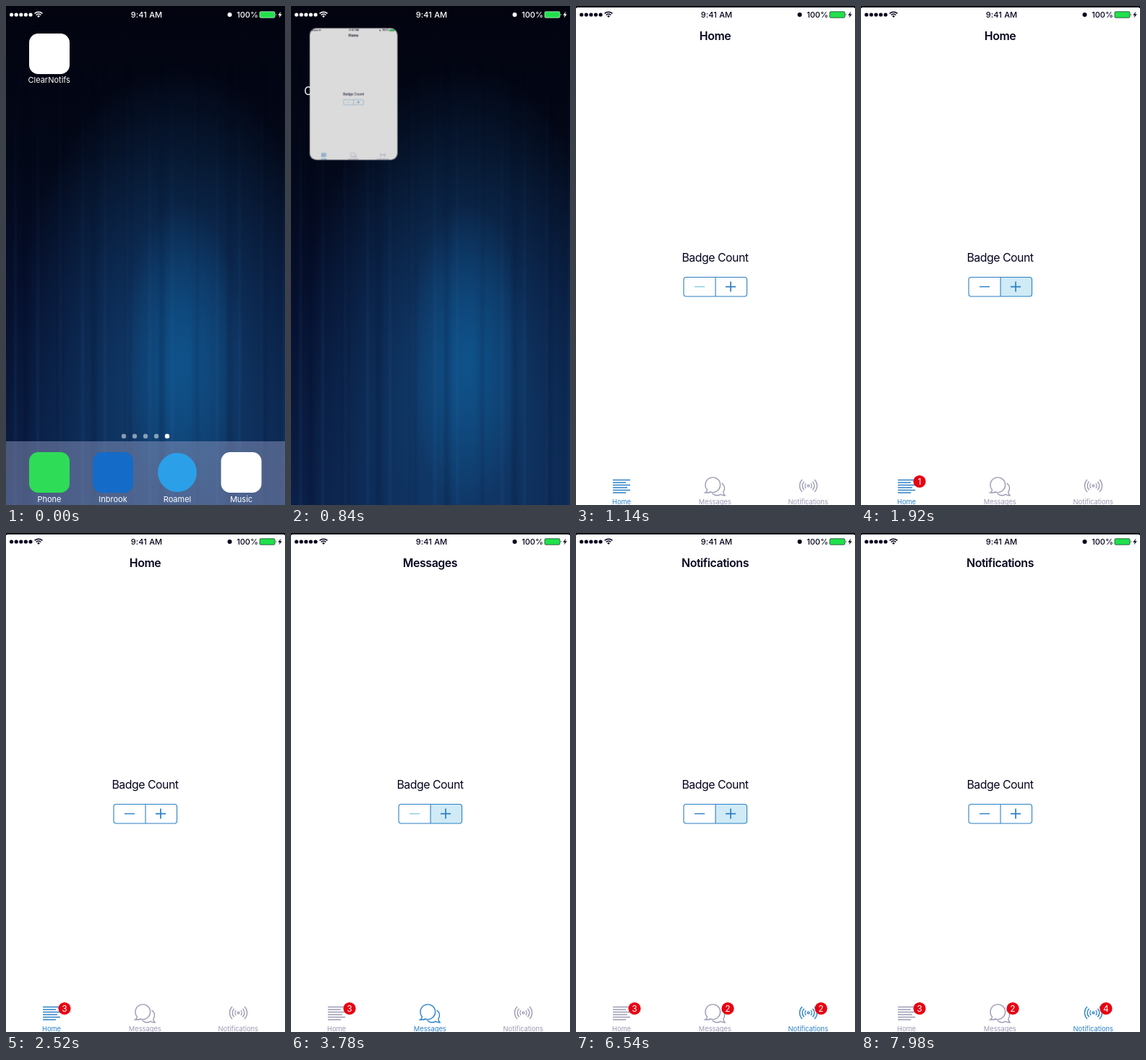
An HTML page that plays this animation: 386x689 px, repeating every 8 s.

```html
<!DOCTYPE html>
<html lang="en">
<head>
<meta charset="utf-8">
<title>Badge count</title>
<style>
html, body { margin: 0; width: 100%; height: 100%; overflow: hidden; background: #02030f; }
#stage { position: relative; width: 386px; height: 689px; overflow: hidden; }
#stage > * { position: absolute; left: 0; top: 0; width: 386px; height: 689px; }
svg { font-family: Inter, Roboto, sans-serif; }
text { text-anchor: middle; fill: currentColor; stroke: none; }

#wall {
  background:
    radial-gradient(ellipse 85px 210px at 245px 485px, rgba(13, 88, 146, .75), transparent),
    radial-gradient(ellipse 230px 440px at 235px 520px, rgba(20, 76, 130, .85), transparent),
    linear-gradient(#02030f, #030818 30%, #06102e 60%, #0b2048);
}
#streaks {
  background:
    repeating-linear-gradient(90deg, transparent 0 9px, rgba(70, 130, 200, .09) 13px, transparent 17px 31px),
    repeating-linear-gradient(90deg, transparent 0 21px, rgba(0, 0, 20, .16) 27px, transparent 35px 47px);
  -webkit-mask-image: linear-gradient(transparent 10%, #000 70%);
  mask-image: linear-gradient(transparent 10%, #000 70%);
}

.status { font-size: 11px; font-weight: 500; }
.label { font-size: 11px; }
#springboard { color: #fff; transform-origin: 60px 65.5px; animation: zoom 8s infinite; }
#icon { animation: press 8s step-end infinite; }
#app {
  color: #05051e; background: #fff; transform-origin: 0 0;
  animation: launch 8s infinite, develop 8s infinite;
}
.title { font-size: 15.85px; font-weight: 600; letter-spacing: -.025em; }
.caption { font-size: 15.85px; letter-spacing: -.03em; }
.tab { color: #9a9ab4; font-size: 9.3px; }
.tab.on, #stepper { color: #2a80c6; }
.line { fill: none; stroke: currentColor; stroke-width: 1.4; }
.badge { color: #fff; font-size: 12px; }

@keyframes zoom {
  0%, 9.125% { transform: none; animation-timing-function: cubic-bezier(.42, 0, .4, 1); }
  14.125%, 100% { transform: scale(3.13); }
}
@keyframes press {
  0% { fill: #fff; opacity: 1; }
  8% { fill: #8a8a90; opacity: 1; }
  9.125%, 100% { fill: #8a8a90; opacity: 0; }
}
@keyframes launch {
  0%, 9.125% {
    transform: translate(32px, 38px) scale(.1451, .0813);
    clip-path: inset(0 0 0 0 round 36px 36px 36px 36px / 46px 46px 46px 46px);
    animation-timing-function: cubic-bezier(.42, 0, .4, 1);
  }
  14.125%, 100% {
    transform: translate(0, 0) scale(1, 1);
    clip-path: inset(2px 0 0 0 round 4px 4px 0 0 / 4px 4px 0 0);
  }
}
@keyframes develop {
  0% { opacity: 0; filter: brightness(.54); animation-timing-function: step-end; }
  9.125% { opacity: 1; filter: brightness(.54); animation-timing-function: linear; }
  10.5% { opacity: 1; filter: brightness(.86); animation-timing-function: linear; }
  13%, 100% { opacity: 1; filter: brightness(1); }
}
</style>
</head>
<body>
<div id="stage">
  <div id="wall"></div>
  <div id="streaks"></div>

  <svg viewBox="0 0 386 689" color="#fff">
    <defs>
      <g id="status" class="status">
        <g id="signal" fill="currentColor"></g>
        <g fill="none" stroke="currentColor" stroke-width="1.5">
          <path d="M39.6 10.4A7.7 7.7 0 0 1 50.4 10.4M41.6 12.5A4.8 4.8 0 0 1 48.4 12.5"/>
        </g>
        <path d="M43.1 13.9A2.7 2.7 0 0 1 46.9 13.9L45 16Z" fill="currentColor"/>
        <text x="194.5" y="16" letter-spacing=".15">9:41 AM</text>
        <circle cx="309.5" cy="12" r="3" fill="currentColor"/>
        <text x="334" y="16">100%</text>
        <rect x="351" y="7.8" width="21" height="8.4" rx="1.4" fill="#22e04c" stroke="currentColor" stroke-width=".6"/>
        <path d="M373 10.4Q374.6 12 373 13.6Z" fill="currentColor"/>
        <path d="M380.3 7.5L376.3 12.7H378.8L377.6 16.5L381.8 11.2H379.2Z" fill="currentColor"/>
      </g>
    </defs>
    <use href="#status"/>
  </svg>

  <svg id="springboard" viewBox="0 0 386 689">
    <rect id="icon" x="32" y="38" width="56" height="56" rx="12.5"/>
    <text class="label" x="59.7" y="106">ClearNotifs</text>
    <g id="pages" fill="#fff"></g>
    <rect y="601" width="386" height="88" fill="rgb(140,150,190)" fill-opacity=".5"/>
    <rect x="32" y="616" width="56" height="56" rx="12.5" fill="#2fdc57"/>
    <rect x="120" y="616" width="56" height="56" rx="12.5" fill="#146bc8"/>
    <circle cx="237" cy="644" r="27" fill="#2b9fe8"/>
    <rect x="297.5" y="616" width="56" height="56" rx="12.5" fill="#fff"/>
    <g class="label">
      <text x="60" y="685">Phone</text>
      <text x="148" y="685">Inbrook</text>
      <text x="237" y="685">Roamel</text>
      <text x="325.5" y="685">Music</text>
    </g>
  </svg>

  <svg id="app" viewBox="0 0 386 689">
    <use href="#status"/>
    <text id="title" class="title" x="192.5" y="47"></text>
    <text class="caption" x="192.5" y="352.7">Badge Count</text>
    <g id="stepper">
      <path id="pressed" d="M193 374.5H233Q236.5 374.5 236.5 378V397.5Q236.5 401 233 401H193Z" fill="#d0eaf6"/>
      <rect class="line" style="stroke-width:1.1" x="149" y="374.5" width="87.5" height="26.5" rx="3.5"/>
      <path class="line" style="stroke-width:1.1" d="M193 374.5V401"/>
      <path id="minus" class="line" d="M164 387.6H178"/>
      <path class="line" style="stroke-width:1.7" d="M207 387.6H221M214 380.6V394.6"/>
    </g>
    <g class="tab">
      <path class="line" d="M51 654.5H75M51 658H69M51 661.5H75M51 665H71M51 668.5H75M51 672H69"/>
      <text x="63" y="688">Home</text>
    </g>
    <g class="tab">
      <path class="line" d="M181.5 668A10.3 10.3 0 1 1 186 671Q183 672.5 178.6 672Q181.4 670.5 181.5 668Z"/>
      <path class="line" d="M201.5 658.8A8.3 8.3 0 0 1 203.8 671Q203.8 674 206 675.7Q202.5 676.2 200 674.3A10 10 0 0 1 188.5 673"/>
      <text x="192.3" y="688">Messages</text>
    </g>
    <g class="tab">
      <g id="waves" class="line"></g>
      <text x="321.3" y="688">Notifications</text>
    </g>
    <g id="badges"></g>
  </svg>
</div>

<script>
const LOOP = 8000;
const PRESS = 200;
const DELAY = 120;
const tabs = [
  { name: 'Home', from: 0, x: 81, taps: [1480, 1840, 2200] },
  { name: 'Messages', from: 3060, x: 210, taps: [3710, 4140] },
  { name: 'Notifications', from: 4860, x: 339, taps: [5700, 6120, 6540, 6960] }
];

const get = id => document.getElementById(id);
const dots = (n, x, step, y, r, fade) => Array.from({ length: n }, (_, i) =>
  `<circle cx="${x + i * step}" cy="${y}" r="${r}" opacity="${i < n - 1 ? fade : 1}"/>`).join('');

get('signal').innerHTML = dots(5, 7.6, 6.6, 12, 2.6, 1);
get('pages').innerHTML = dots(5, 163, 15, 594, 3.2, .5);

// Mirrored arcs around the centre of the broadcast symbol
get('waves').innerHTML = '<circle cx="321.5" cy="662.5" r="1.4"/>' +
  [4.6, 8.3, 12].map(r => {
    const dx = r * Math.cos(.78), dy = r * Math.sin(.78);
    return [-1, 1].map(s => `<path d="M${321.5 + s * dx} ${662.5 - dy}` +
      `A${r} ${r} 0 0 ${s > 0 ? 1 : 0} ${321.5 + s * dx} ${662.5 + dy}"/>`).join('');
  }).join('');

get('badges').innerHTML = tabs.map(({ x }) =>
  `<g class="badge"><circle cx="${x}" cy="656.5" r="8.6" fill="#e60012"/><text x="${x}" y="660.9"></text></g>`).join('');

const tabItems = document.querySelectorAll('.tab');
const badges = document.querySelectorAll('.badge');
let start;

function render(now) {
  start ??= now;
  const time = (now - start) % LOOP;
  const counts = tabs.map(tab => tab.taps.filter(t => time >= t + DELAY).length);
  const active = tabs.filter(tab => time >= tab.from).length - 1;

  tabs.forEach((tab, i) => {
    tabItems[i].classList.toggle('on', i === active);
    badges[i].style.visibility = counts[i] ? 'visible' : 'hidden';
    badges[i].lastChild.textContent = counts[i];
  });
  get('title').textContent = tabs[active].name;
  get('minus').style.stroke = counts[active] ? '' : '#86cbe4';
  const held = tabs[active].taps.some(t => time >= t && time < t + PRESS);
  get('pressed').style.visibility = held ? 'visible' : 'hidden';
  requestAnimationFrame(render);
}
requestAnimationFrame(render);
</script>
</body>
</html>
```
